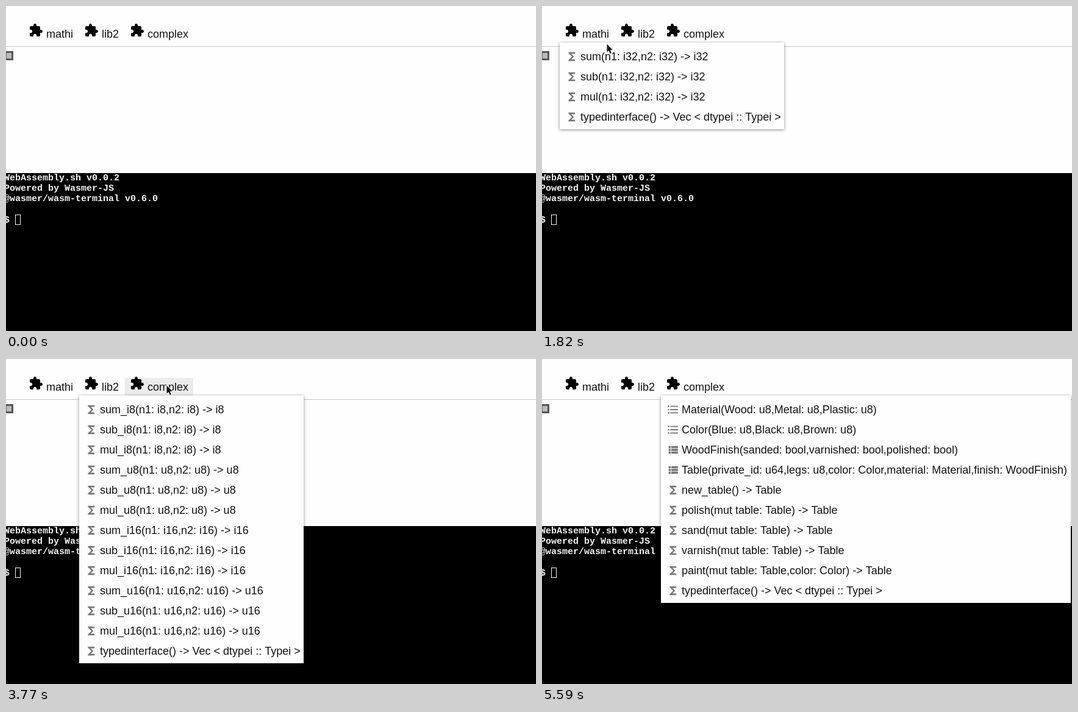
Animation, 869 px wide and 533 px high, one loop 6500 ms. Source, as an HTML page with a canvas:

```html
<!DOCTYPE html>
<html lang="en">
<head>
<meta charset="utf-8">
<title>Module explorer</title>
<style>
  html, body { margin: 0; width: 100%; height: 100%; overflow: hidden; background: #fefefe; }
  canvas { display: block; width: 869px; height: 533px; }
</style>
</head>
<body>
<canvas id="stage" width="869" height="533"></canvas>
<script>
const ctx = document.getElementById('stage').getContext('2d');
const LOOP = 6500, STEP = 130;
const SANS = '18px "Liberation Sans", Arial, sans-serif';
const MONO = 'bold 15px "Liberation Mono", "Courier New", monospace';

const icons = {
  puzzle: new Path2D('M20.5 11H19V7c0-1.1-.9-2-2-2h-4V3.5C13 2.1 11.9 1 10.5 1S8 2.1 8 3.5V5H4c-1.1 0-2 .9-2 2v3.8h1.5c1.5 0 2.7 1.2 2.7 2.7s-1.2 2.7-2.7 2.7H2V20c0 1.1.9 2 2 2h3.8v-1.5c0-1.5 1.2-2.7 2.7-2.7s2.7 1.2 2.7 2.7V22H17c1.1 0 2-.9 2-2v-4h1.5c1.4 0 2.5-1.1 2.5-2.5S21.9 11 20.5 11z'),
  func: new Path2D('M18 4H6v2l6.5 6L6 18v2h12v-3h-7l5-5-5-5h7z'),
  list: new Path2D(),
  struct: new Path2D()
};
for (const y of [6, 12, 18]) {
  icons.list.rect(7, y - 1, 14, 2);
  icons.list.moveTo(5.5, y);
  icons.list.arc(4, y, 1.5, 0, Math.PI * 2);
}
for (const y of [5, 10, 15]) {
  icons.struct.rect(4, y, 4, 4);
  icons.struct.rect(9, y, 12, 4);
}
const arrow = new Path2D('M0 0V13.2L3 10.4L5.2 15.4L7.4 14.4L5.2 9.6H9.4Z');

const ops = ['sum', 'sub', 'mul'];
const typed = 'typedinterface() -> Vec < dtypei :: Typei >';
const binary = (op, type, name = op) => `${name}(n1: ${type},n2: ${type}) -> ${type}`;

const tabs = [
  {
    label: 'mathi', x: 29, w: 89, opens: 1430, menuW: 368,
    rows: [...ops.map(op => binary(op, 'i32')), typed]
  },
  {
    label: 'lib2', x: 120, w: 73, opens: 2860, menuW: 368,
    rows: [
      ...['i8', 'u8', 'i16', 'u16'].flatMap(t => ops.map(op => binary(op, t, `${op}_${t}`))),
      typed
    ]
  },
  {
    label: 'complex', x: 195, w: 112, opens: 4160, menuW: 672,
    kinds: ['list', 'list', 'struct', 'struct'],
    rows: [
      'Material(Wood: u8,Metal: u8,Plastic: u8)',
      'Color(Blue: u8,Black: u8,Brown: u8)',
      'WoodFinish(sanded: bool,varnished: bool,polished: bool)',
      'Table(private_id: u64,legs: u8,color: Color,material: Material,finish: WoodFinish)',
      'new_table() -> Table',
      ...['polish', 'sand', 'varnish'].map(f => `${f}(mut table: Table) -> Table`),
      'paint(mut table: Table,color: Color) -> Table',
      typed
    ]
  }
];

// Pointer stops: time, x, y; each holds until the next.
const stops = [
  [130, 172, 302], [260, 118, 222], [390, 48, 132], [520, 4, 66],
  [650, 22, 24], [780, 62, 17], [910, 82, 34], [1040, 86, 43],
  [1820, 106, 62], [1950, 154, 104], [2080, 226, 131], [2210, 203, 78],
  [2340, 165, 43], [3510, 184, 44], [3640, 226, 44], [3770, 263, 43],
  [5200, 104, 323], [5330, 480, 210], [5460, 849, 120]
];
const LEAVE = 5590;

function box(color, x, y, w, h) {
  ctx.fillStyle = color;
  ctx.fillRect(x, y, w, h);
}

function text(str, x, y, font, color) {
  ctx.font = font;
  ctx.fillStyle = color;
  ctx.fillText(str, x, y);
}

function icon(path, x, y, scale, color) {
  ctx.save();
  ctx.translate(x, y);
  ctx.scale(scale, scale);
  ctx.fillStyle = color;
  ctx.fill(path);
  ctx.restore();
}

function drawTerminal() {
  box('#000', 0, 274, 869, 259);
  const lines = ['WebAssembly.sh v0.0.2', 'Powered by Wasmer-JS', '@wasmer/wasm-terminal v0.6.0', '', '$'];
  lines.forEach((line, i) => text(line, -3, 286 + i * 17.2, MONO, '#f4f4f4'));
  ctx.strokeStyle = '#f4f4f4';
  ctx.lineWidth = 1;
  ctx.strokeRect(15.5, 342.5, 8, 16);
}

function drawTab(tab, hovered) {
  if (hovered) box('#ececec', tab.x, 31, tab.w, 29);
  icon(icons.puzzle, tab.x + 8, 28, 1, '#000');
  text(tab.label, tab.x + 37, 52, SANS, '#111');
}

function drawMenu({ x, menuW, rows, kinds = [] }) {
  ctx.save();
  ctx.shadowColor = 'rgba(0,0,0,.45)';
  ctx.shadowBlur = 5;
  ctx.shadowOffsetY = 1;
  box('#fefefe', x, 60, menuW, rows.length * 33 + 10);
  ctx.restore();
  rows.forEach((row, i) => {
    const y = 83 + i * 33;
    icon(icons[kinds[i] || 'func'], x + 9, y - 10.8, 0.9, '#777');
    text(row, x + 34, y + 6, SANS, '#111');
  });
}

function drawPointer(x, y) {
  ctx.save();
  ctx.translate(x + 0.5, y + 0.5);
  ctx.lineJoin = 'round';
  ctx.lineWidth = 2;
  ctx.strokeStyle = '#fff';
  ctx.stroke(arrow);
  ctx.fillStyle = '#111';
  ctx.fill(arrow);
  ctx.restore();
}

function pointerAt(t) {
  if (t >= LEAVE) return null;
  const stop = stops.findLast(s => s[0] <= t);
  return stop ? { x: stop[1], y: stop[2] } : null;
}

const over = (tab, p) => p && p.y >= 31 && p.y < 60 && p.x >= tab.x && p.x < tab.x + tab.w;

function draw(now) {
  const t = Math.floor((now % LOOP) / STEP) * STEP;
  const pointer = pointerAt(t);
  box('#fefefe', 0, 0, 869, 533);
  box('#c8c8c8', 0, 66, 869, 1);
  box('#575757', 0, 74, 12, 15);
  box('#bcbcbc', 1, 77, 8, 9);
  drawTerminal();
  for (const tab of tabs) drawTab(tab, over(tab, pointer));
  const open = tabs.findLast(tab => tab.opens <= t);
  if (open) drawMenu(open);
  if (pointer) drawPointer(pointer.x, pointer.y);
}

const start = performance.now();
function loop() {
  draw(performance.now() - start);
  requestAnimationFrame(loop);
}
loop();
</script>
</body>
</html>
```
